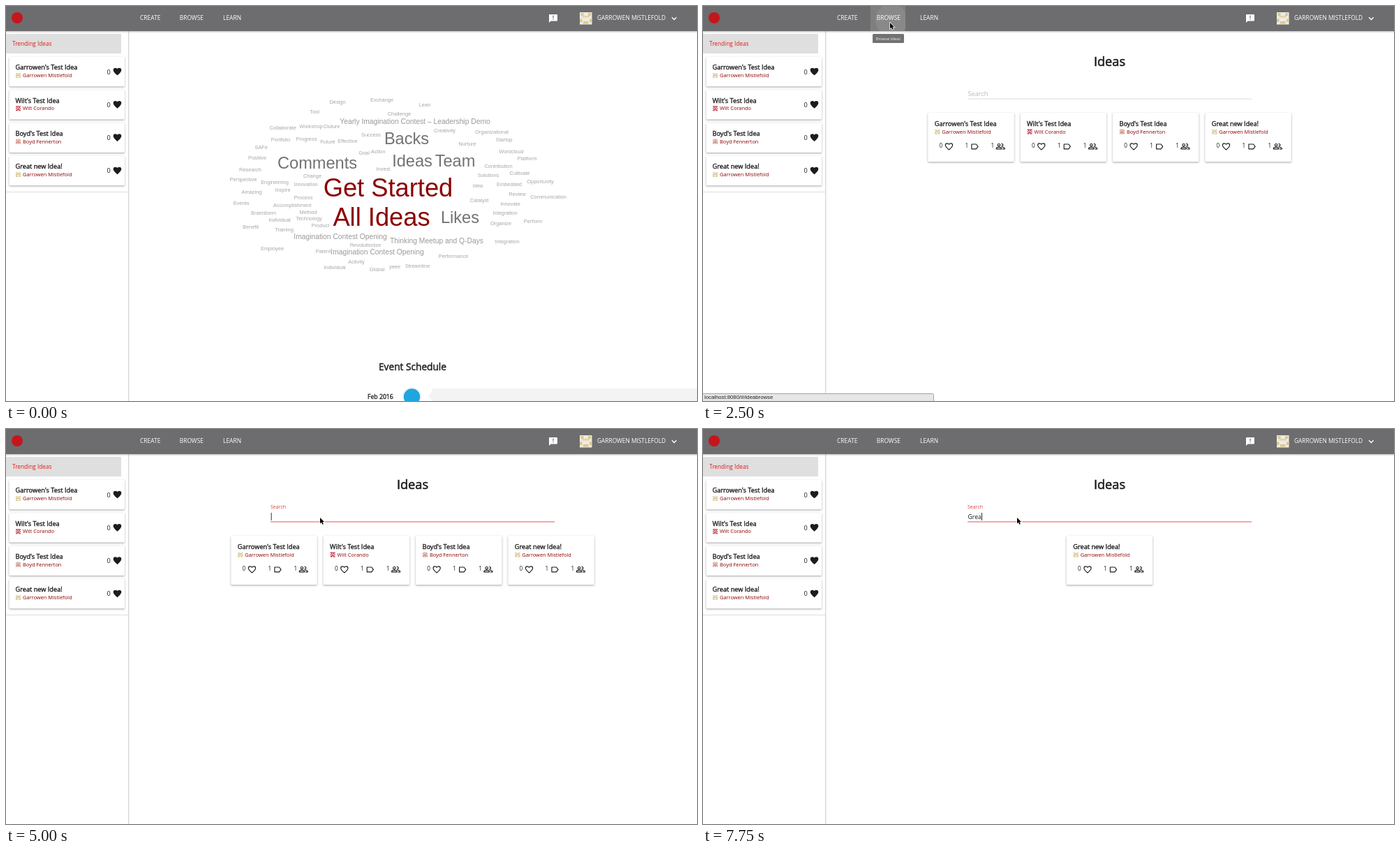
Write an HTML page with a canvas that moves like this. It is 990 by 566 pixels and loops after 8000 ms.

```html
<!DOCTYPE html>
<html lang="en">
<head>
<meta charset="utf-8">
<title>Ideas</title>
<style>
html, body { margin: 0; width: 100%; height: 100%; overflow: hidden; background: #fff; }
canvas { display: block; }
</style>
</head>
<body>
<canvas id="stage" width="990" height="566"></canvas>
<script>
const ctx = document.getElementById('stage').getContext('2d');
const LOOP = 8000;
const UI = '"Open Sans", sans-serif';
const ARIAL = '"Liberation Sans", Arial, sans-serif';
const INK = '#1c1c1c', WINE = '#8b0000', BAR = '#6d6d6f';

const TAN = '#dcc98c', ROSE = '#c8374a', CLAY = '#cf8a7c';
const people = {
  garrowen: { name: 'Garrowen Mistlefold', color: TAN, rows: [17, 14, 31, 17, 27] },
  wilt: { name: 'Wilt Corando', color: ROSE, rows: [31, 10, 21, 14, 27] },
  boyd: { name: 'Boyd Fennerton', color: CLAY, rows: [10, 21, 14, 31, 21] }
};
const ideas = [
  { title: "Garrowen's Test Idea", by: people.garrowen },
  { title: "Wilt's Test Idea", by: people.wilt },
  { title: "Boyd's Test Idea", by: people.boyd },
  { title: 'Great new Idea!', by: people.garrowen }
];

const words = [
  ['Design', 475, 137], ['Exchange', 538.5, 134], ['Lean', 600, 141], ['Tool', 442, 151],
  ['Challenge', 563.5, 154], ['Collaborate', 396.5, 174], ['Workshop', 437, 172.5],
  ['Cluture', 466.5, 172], ['Portfolio', 393.5, 191.5], ['Progress', 430.5, 190],
  ['Future', 461, 194.5], ['Effective', 489.5, 193.5], ['Success', 523, 184],
  ['Creativity', 628.5, 178], ['Organizational', 696, 180], ['Startup', 713.5, 191],
  ['Nurture', 661, 197], ['SAFe', 365.5, 202.5], ['Positive', 360, 217], ['Goal', 513, 210],
  ['Action', 533, 208.5], ['Wordcloud', 724, 208.5], ['Platform', 746.5, 218],
  ['Contribution', 705.5, 229], ['Research', 350, 234.5], ['Invest', 540.5, 233],
  ['Change', 439, 243], ['Cultivate', 736, 239], ['Solutions', 691, 242],
  ['Perspective', 340, 248], ['Engineering', 385, 252], ['Innovation', 429.5, 255.5],
  ['Idea', 676, 257.5], ['Embedded', 721, 255], ['Opportunity', 765.5, 251],
  ['Amazing', 352, 266.5], ['Inspire', 396.5, 263.5], ['Review', 732.5, 269],
  ['Communication', 777, 273], ['Process', 426, 274.5], ['Catalyst', 678, 278.5],
  ['Innovate', 722.5, 283], ['Events', 337, 282], ['Accomplishment', 410, 285.5],
  ['Brainstorm', 369, 296], ['Method', 433, 295], ['Integration', 715, 296.5],
  ['Individual', 392, 306], ['Technology', 434, 304], ['Organize', 709, 311],
  ['Perform', 755, 308], ['Benefit', 350.5, 316], ['Training', 398.5, 320.5],
  ['Product', 450.5, 314], ['Employee', 381.5, 347], ['Revolutionize', 515, 342],
  ['Integration', 718, 337], ['Patent', 454.5, 351.5], ['Performance', 641, 358.5],
  ['Activity', 502, 366], ['Individual', 471, 374], ['Global', 531.5, 377.5],
  ['yeee', 557, 373], ['Streamline', 589.5, 372.5]
];
const phrases = [
  ['Yearly Imagination Contest – Leadership Demo', 586, 165],
  ['Imagination Contest Opening', 479, 330],
  ['Thinking Meetup and Q-Days', 617, 336.5],
  ['Imagination Contest Opening', 532, 352.5]
];
const topics = [
  ['Backs', 574, 190], ['Ideas', 582, 222], ['Team', 643.5, 222],
  ['Comments', 446, 225], ['Likes', 650.5, 303]
];
const actions = [['Get Started', 547.5, 260.5], ['All Ideas', 538, 302.5]];

// time, x, y of the pointer
const pointer = [
  [250, 711, 94], [500, 640, 70], [750, 520, 46], [1000, 400, 30], [1250, 320, 47],
  [1500, 291, 38], [1750, 268, 24], [3000, 330, 72], [3250, 455, 121], [3500, 450, 127]
];
const typing = [[0, ''], [5250, 'G'], [6000, 'Gr'], [6750, 'Gre'], [7500, 'Grea']];
const caret = [
  [0, false], [4000, true], [4500, false], [5000, true], [5750, false], [6000, true],
  [6500, false], [6750, true], [7250, false], [7500, true]
];

const heart = new Path2D('M12 20C6 14.8 3 12.2 3 8.5 3 6 5 4 7.5 4 9.3 4 11 5 12 6.6 13 5 14.7 4 16.5 4 19 4 21 6 21 8.5 21 12.2 18 14.8 12 20z');
const label = new Path2D('M4 6H15.5L20 12 15.5 18H4z');
const group = new Path2D('M11 8.5a3 3 0 1 0-6 0a3 3 0 1 0 6 0zM1.5 18.5V17C1.5 13 14.5 13 14.5 17V18.5zM14 5.8a3 3 0 1 1 0 5.4M16 14.2C19 14 22.5 15 22.5 17V18.5H17');
const arrow = new Path2D('M0 0V10L2.3 8 3.9 11.6 5.7 10.8 4.1 7.3H7.1z');

const at = (list, t) => list.filter(k => k[0] <= t).pop();

function rect(x, y, w, h, color) {
  ctx.fillStyle = color;
  ctx.fillRect(x, y, w, h);
}

function disc(x, y, r, color) {
  ctx.fillStyle = color;
  ctx.beginPath();
  ctx.arc(x, y, r, 0, Math.PI * 2);
  ctx.fill();
}

function text(s, x, y, size, color, { font = UI, align = 'left', bold = 0 } = {}) {
  ctx.font = `${size}px ${font}`;
  ctx.textAlign = align;
  ctx.fillStyle = ctx.strokeStyle = color;
  ctx.fillText(s, x, y);
  if (bold) {
    ctx.lineWidth = bold;
    ctx.strokeText(s, x, y);
  }
}

function icon(path, cx, cy, size, color, solid) {
  ctx.save();
  ctx.translate(cx - size / 2, cy - size / 2);
  ctx.scale(size / 24, size / 24);
  ctx.lineWidth = 2;
  ctx.lineJoin = 'round';
  ctx.strokeStyle = ctx.fillStyle = color;
  ctx.stroke(path);
  if (solid) ctx.fill(path);
  ctx.restore();
}

function avatar(x, y, size, { color, rows }) {
  rect(x, y, size, size, '#f1eeea');
  const c = size / 5;
  rows.forEach((bits, r) => {
    for (let i = 0; i < 5; i++) if (bits >> i & 1) rect(x + i * c, y + r * c, c, c, color);
  });
}

function panel(x, y, w, h) {
  ctx.save();
  ctx.shadowColor = 'rgba(0,0,0,.36)';
  ctx.shadowBlur = 2.5;
  ctx.shadowOffsetY = 1;
  ctx.fillStyle = '#fff';
  ctx.beginPath();
  ctx.roundRect(x, y, w, h, 1.2);
  ctx.fill();
  ctx.restore();
}

function heading(idea, x, y) {
  text(idea.title, x, y, 9.2, INK, { bold: 0.35 });
  avatar(x + 0.5, y + 4.6, 7, idea.by);
  text(idea.by.name, x + 10.5, y + 10.7, 7.45, WINE);
}

function sidebar() {
  rect(175, 36, 1, 530, '#d6d6d6');
  rect(176, 36, 1, 530, '#f1f1f1');
  rect(0, 266, 175, 1, '#dedede');
  rect(0, 40, 165, 28, '#dfdfdf');
  text('Trending Ideas', 9, 57, 8.25, '#e01b1b');
  ideas.forEach((idea, i) => {
    const y = 73 + i * 47.3;
    panel(4.5, y, 165.5, 42.3);
    heading(idea, 13.5, y + 18.4);
    text('0', 144.5, y + 24.5, 9.2, INK);
    icon(heart, 159.5, y + 21, 14, INK, true);
  });
}

function header(t) {
  const shade = ctx.createLinearGradient(0, 36, 0, 39);
  shade.addColorStop(0, 'rgba(0,0,0,.2)');
  shade.addColorStop(1, 'rgba(0,0,0,0)');
  rect(0, 36, 990, 3, shade);
  rect(0, 0, 990, 36, BAR);
  if (t >= 1750 && t < 3000) {
    rect(240, 0, 50, 36, '#7f7f80');
    if (t >= 2500 && t < 2750) {
      ctx.save();
      ctx.beginPath();
      ctx.rect(240, 0, 50, 36);
      ctx.clip();
      disc(270, 20, 23, '#89898a');
      ctx.restore();
    }
  }
  disc(16, 17, 8, '#c4161c');
  text('CREATE', 192, 20, 8.45, '#fff');
  text('BROWSE', 248.7, 20, 8.45, '#fff');
  text('LEARN', 311, 20, 8.45, '#fff');

  ctx.fillStyle = '#fff';
  ctx.beginPath();
  ctx.roundRect(778, 12, 12, 9.5, 1);
  ctx.fill();
  ctx.beginPath();
  ctx.moveTo(778, 19);
  ctx.lineTo(778, 24);
  ctx.lineTo(781, 21);
  ctx.fill();
  rect(783.4, 13.5, 1.2, 3.8, BAR);
  rect(783.4, 18.3, 1.2, 1.2, BAR);

  rect(822, 9, 17.5, 17.5, '#eeebe4');
  rect(823.5, 10, 4, 4, TAN);
  rect(834, 10, 4, 4, TAN);
  rect(825.5, 14, 10.5, 2.5, '#e2d5aa');
  rect(822, 18.5, 3.5, 4.5, TAN);
  rect(836, 18.5, 3.5, 4.5, TAN);
  rect(827, 22, 7.5, 3.5, TAN);
  text('GARROWEN MISTLEFOLD', 847, 20, 8.35, '#fff');
  ctx.strokeStyle = '#fff';
  ctx.lineWidth = 1.4;
  ctx.beginPath();
  ctx.moveTo(954, 16.3);
  ctx.lineTo(957.3, 19.6);
  ctx.lineTo(960.6, 16.3);
  ctx.stroke();
}

function cloud() {
  const put = (list, size, color) => list.forEach(([s, x, y]) =>
    text(s, x, y + size * 0.35, size, color, { font: ARIAL, align: 'center' }));
  put(words, 7.45, '#a6a6a6');
  put(phrases, 10.3, '#999');
  put(topics, 23.6, '#737373');
  put(actions, 36.3, WINE);

  text('Event Schedule', 582.5, 522, 13.7, INK, { align: 'center', bold: 0.45 });
  text('Feb 2016', 518, 563, 8.7, INK, { bold: 0.3 });
  disc(581.5, 560, 13.5, '#eef1f2');
  disc(581.5, 560, 11.7, '#1fa6e0');
  rect(610, 548, 380, 18, '#f3f3f3');
  ctx.beginPath();
  ctx.moveTo(610, 553);
  ctx.lineTo(605, 559);
  ctx.lineTo(610, 565);
  ctx.fill();
}

function card(idea, x) {
  panel(x, 153, 123.5, 70.3);
  heading(idea, x + 9.5, 172);
  text('0', x + 16.3, 203.4, 8.2, INK);
  icon(heart, x + 30.2, 201.4, 13.7, INK);
  text('1', x + 53.3, 203.4, 8.2, INK);
  icon(label, x + 67.2, 201.4, 13.7, INK);
  text('1', x + 90.2, 203.4, 8.2, INK);
  icon(group, x + 104, 201.2, 13.7, INK);
}

function browse(t) {
  const focus = t >= 4000;
  text('Ideas', 582.5, 86.3, 18.2, INK, { align: 'center', bold: 0.55 });
  rect(379, 132.5, 407, 1, focus ? '#dd5a55' : '#dcdcdc');
  if (!focus) text('Search', 379.5, 129.2, 9.2, '#b8b8b8');
  else if (t < 4250) text('Search', 379.5, 122.7, 8.3, '#ea5850');
  else text('Search', 379, 114.4, 7, '#e2403c');

  const query = at(typing, t)[1];
  text(query, 379.5, 128.6, 8.7, INK);
  if (at(caret, t)[1]) rect(379.7 + ctx.measureText(query).width, 120, 0.9, 11, INK);

  const hits = query.length > 2 ? [3] : query ? [0, 1, 3] : [0, 1, 2, 3];
  hits.forEach((n, i) => card(ideas[n], 586.95 + (i - hits.length / 2) * 132.35));
}

function overlays(t) {
  if (t >= 2000 && t < 3000) {
    ctx.fillStyle = '#727272';
    ctx.beginPath();
    ctx.roundRect(243, 40, 45, 13, 1.5);
    ctx.fill();
    text('Browse Ideas', 265.3, 48.6, 5.7, '#eee', { align: 'center' });
  }
  if (t >= 1750 && t < 3000) {
    ctx.fillStyle = '#e6e6e6';
    ctx.strokeStyle = '#a3a3a3';
    ctx.lineWidth = 1;
    ctx.beginPath();
    ctx.roundRect(-0.5, 555.5, 331, 12, [0, 2, 0, 0]);
    ctx.fill();
    ctx.stroke();
    text('localhost:8080/#/ideabrowse', 2, 563.2, 7.75, '#222', { font: ARIAL });
  }
  const p = at(pointer, t);
  if (!p) return;
  ctx.save();
  ctx.translate(p[1], p[2]);
  ctx.scale(0.85, 0.85);
  ctx.lineWidth = 1.6;
  ctx.strokeStyle = '#fff';
  ctx.stroke(arrow);
  ctx.fillStyle = '#000';
  ctx.fill(arrow);
  ctx.restore();
}

function draw(now) {
  const t = now % LOOP;
  rect(0, 0, 990, 566, '#fff');
  if (t < 2500) cloud();
  else browse(t);
  sidebar();
  header(t);
  overlays(t);
  requestAnimationFrame(draw);
}
requestAnimationFrame(draw);
</script>
</body>
</html>
```
